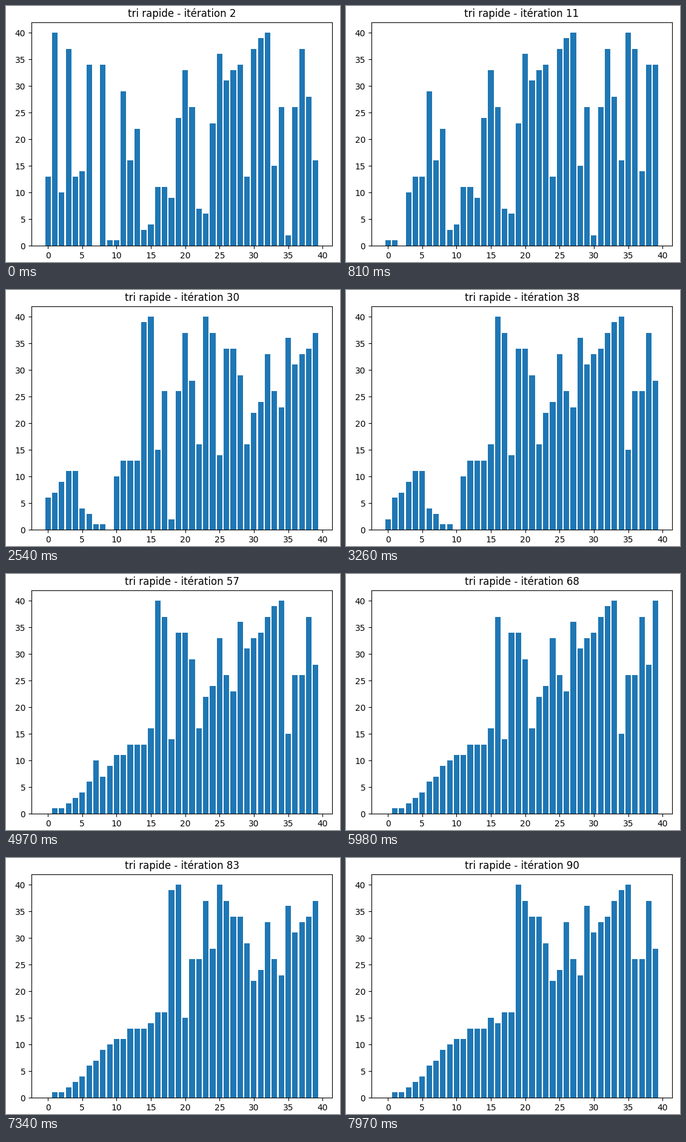
Recreate the animation shown at these times as a matplotlib script. Size 551 by 423 pixels, loop 8 s.

```python
from itertools import islice

import numpy as np
import matplotlib.pyplot as plt
from matplotlib.animation import FuncAnimation

W, H, DPI = 551, 423, 100
LOOP, TICK = 8000, 20
STEPS, FIRST = 89, 2
HOLD, EXTRA = 90, 10
LONG_STEPS = (9, 14, 57, 60, 77)

VALUES = [13, 16, 40, 10, 37, 13, 14, 34, 0, 34, 1, 1, 29, 16, 22, 3, 4, 11, 11, 9,
          24, 33, 26, 7, 6, 23, 36, 31, 33, 34, 13, 37, 39, 40, 15, 26, 2, 26, 37, 28]


def quicksort(a, lo, hi):
    """Sort a[lo:hi] around its first value, yielding a copy after each move."""
    if hi - lo < 2:
        return
    pivot, mid, i = a[lo], lo, lo + 1
    for _ in range(lo + 1, hi):
        v = a[i]
        if v > pivot:
            a.insert(hi - 1, a.pop(i))
            yield list(a)
            continue
        if v < pivot:
            a.insert(lo, a.pop(i))
            mid += 1
            yield list(a)
        i += 1
    yield from quicksort(a, lo, mid)
    yield from quicksort(a, i, hi)


states = list(islice(quicksort(list(VALUES), 0, len(VALUES)), STEPS))
holds = [HOLD + EXTRA * (n in LONG_STEPS) for n in range(STEPS)]
ends = np.cumsum(holds)

plt.rcParams["font.family"] = "DejaVu Sans"
fig = plt.figure(figsize=(W / DPI, H / DPI), dpi=DPI)
ax = fig.add_axes([42 / W, 26.8 / H, 496 / W, 369.6 / H])
bars = ax.bar(range(len(VALUES)), states[0], color="#1f77b4")
ax.set_xlim(-2.39, 41.39)
ax.set_ylim(0, 42)
ax.set_xticks(range(0, 41, 5))
ax.set_yticks(range(0, 41, 5))
title = ax.set_title("")


def update(frame):
    t = frame * TICK + TICK // 2
    n = min(int(np.searchsorted(ends, t, side="right")), STEPS - 1)
    for bar, v in zip(bars, states[n]):
        bar.set_height(v)
    title.set_text(f"tri rapide - itération {n + FIRST}")
    return [*bars, title]


anim = FuncAnimation(fig, update, frames=LOOP // TICK, interval=TICK,
                     repeat=True, cache_frame_data=False)
plt.show()
```
